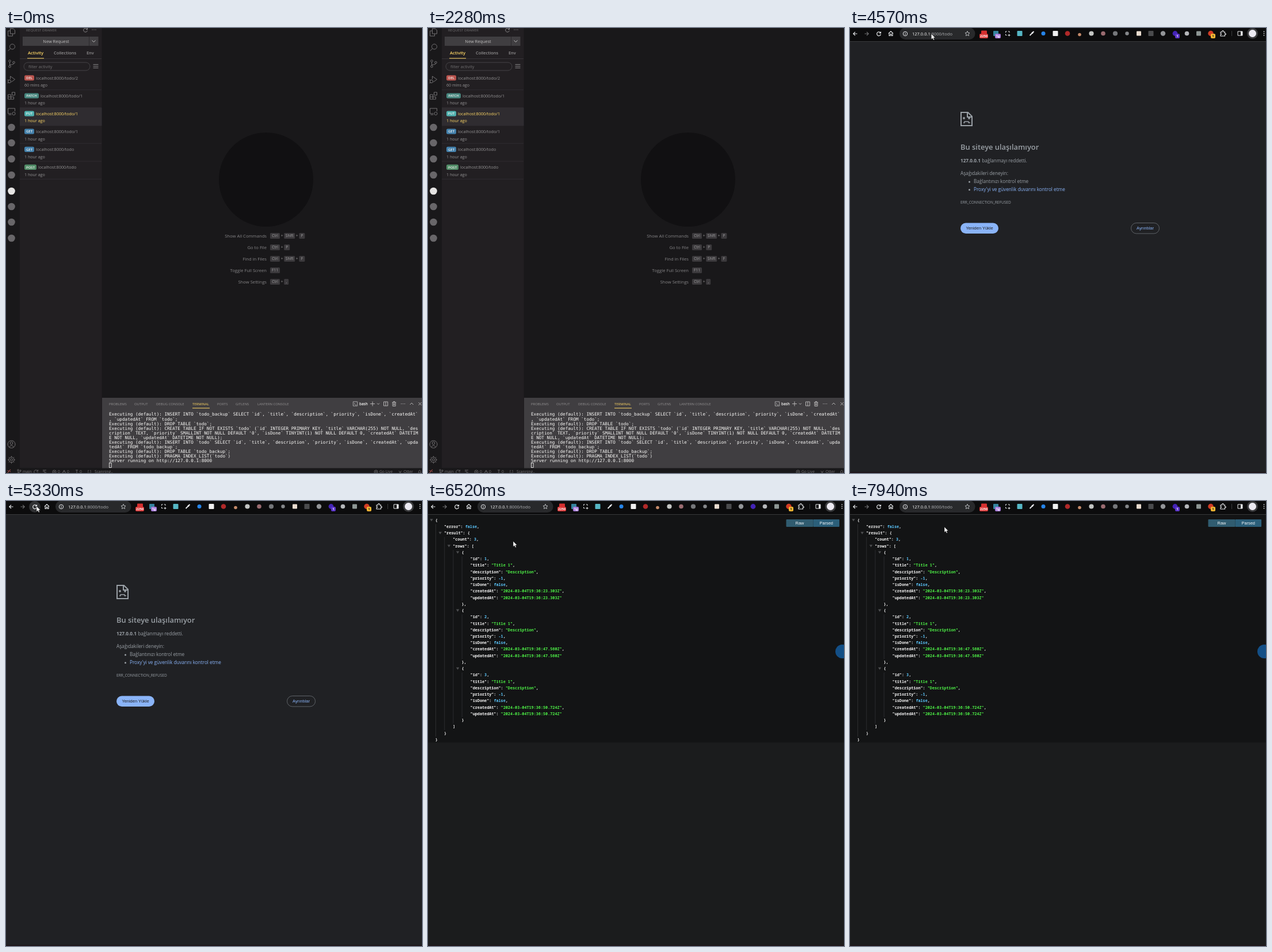
Recreate the animation shown at these times as an HTML page. Size 723x775 px, loop 8 s.

```html
<!DOCTYPE html>
<html lang="tr">
<head>
<meta charset="utf-8">
<style>
html, body { margin: 0; width: 100%; height: 100%; overflow: hidden; background: #19181a; }
svg { display: block; font-family: "Open Sans", "Noto Sans", sans-serif; }
.mono { font-family: "DejaVu Sans Mono", monospace; white-space: pre; }
.code { font-family: "Noto Sans Mono", "DejaVu Sans Mono", monospace; font-weight: 600; white-space: pre; }
.arial { font-family: "Liberation Sans", sans-serif; }
</style>
</head>
<body>
<svg id="stage" width="723" height="775" viewBox="0 0 723 775"></svg>
<script>
// Drawing helpers; text is placed by its vertical centre.
const rect = (x, y, w, h, fill, more = '') =>
  `<rect x="${x}" y="${y}" width="${w}" height="${h}" fill="${fill}" ${more}/>`;
const disc = (x, y, r, fill, more = '') => `<circle cx="${x}" cy="${y}" r="${r}" fill="${fill}" ${more}/>`;
const text = (x, y, str, size, fill, more = '') =>
  `<text x="${x}" y="${y + size * .36}" font-size="${size}" fill="${fill}" ${more}>${str}</text>`;
const icon = (x, y, d, color, width = 1, fill = 'none') =>
  `<path transform="translate(${x} ${y})" d="${d}" stroke="${color}" stroke-width="${width}" fill="${fill}"/>`;
const line = (x1, y1, x2, y2, color, width = 1) => icon(0, 0, `M${x1} ${y1}L${x2} ${y2}`, color, width);
const ring = (x, y, r) => `M${x - r} ${y}a${r} ${r} 0 1 0 ${2 * r} 0a${r} ${r} 0 1 0 ${-2 * r} 0`;
const group = (id, content) => `<g id="${id}">${content}</g>`;
const MIDDLE = 'text-anchor="middle"', END = 'text-anchor="end"', SEMI = 'font-weight="600"';
const GREY = '#727072', SOFT = '#939293', YELLOW = '#ffd866', PANEL = '#403e41', WHITE = '#fcfcfa';
const DOTS = 'M-3.5 0h1.2M-.6 0h1.2M2.3 0h1.2';
const RELOAD = 'M3-1.6A3.4 3.4 0 1 0 3.4 1M3.5-3.6V-1H.9';

function activityBar() {
  const icons = [
    [7, 'M-2-6H3L6-3V3H-2ZM-2-2H-6V7H2V3'],
    [34, ring(1.5, -1.5, 4.5) + 'M-1.7 1.7L-6 6'],
    [62, ring(-3, -4.5, 1.8) + ring(-3, 5, 1.8) + ring(4, -2, 1.8) + 'M-3-2.7V3.2M4-.2Q4 2-2.8 2'],
    [90, 'M-2-1V-6L6-.5L0 4' + ring(-3.5, 3, 2.6) + 'M-7 0l2 1M-7 6l2-1'],
    [118, 'M-6-2H-1V6H-6ZM-6 2H4V6H-1M1-6H6V-1H1Z'],
    [145, 'M0 4H-6V-5H6V0M-5 6H0' + ring(4, 4, 2.6)],
    [725, ring(0, 0, 6.5) + ring(0, -2, 2.3) + 'M-4 5Q0-1 4 5'],
    [752, ring(0, 0, 2) + ring(0, 0, 4.6) + 'M0-4.6V-6.5M0 4.6V6.5M-4.6 0H-6.5M4.6 0H6.5M3.3 3.3l1.3 1.3M-3.3-3.3l-1.3-1.3M3.3-3.3l1.3-1.3M-3.3 3.3l-1.3 1.3'],
  ];
  return icons.map(([y, d]) => icon(9.5, y, d, GREY)).join('') +
    [173, 200, 228, 256, 284, 311, 338, 366].map(y => disc(9.5, y, 6.3, y === 284 ? '#e4e3e2' : '#686669')).join('');
}

function sidebar() {
  const requests = [
    ['DEL', 17, '#b9534d', 'todo/2'], ['PATCH', 25, '#47867e', 'todo/1'], ['PUT', 17, '#4fb0ad', 'todo/1'],
    ['GET', 17, '#4380ab', 'todo/1'], ['GET', 17, '#4380ab', 'todo'], ['POST', 21, '#528d68', 'todo'],
  ];
  const rows = requests.map(([method, width, color, path], i) => {
    const y = 87 + 31.1 * i, active = i === 2, ink = active ? YELLOW : SOFT;
    return (active ? rect(24, 139, 142.5, 31, '#2f2c30') : '') +
      rect(32, y - 4.7, width, 9.2, color, 'rx="2.5"') +
      text(32 + width / 2, y, method, 6, '#f4f4f2', `${MIDDLE} ${SEMI}`) +
      text(35 + width, y, 'localhost:8000/' + path, 7.15, ink) +
      text(32, y + 12.7, i ? '1 hour ago' : '60 mins ago', 7.1, ink) +
      line(24, y + 20.7, 166, y + 20.7, '#2f2c30');
  }).join('');
  return rect(24, 0, 142.5, 766, '#221f22') +
    text(35, 3.5, 'REQUEST DRAWER', 6.1, GREY) +
    icon(138, 3.5, RELOAD, SOFT, .9) + icon(153, 3, DOTS, SOFT, 1.2) +
    rect(29, 15, 131.5, 16, PANEL) + line(144.5, 15, 144.5, 31, '#2a282b') +
    text(87, 23, 'New Request', 7.4, '#c1c0c0', MIDDLE) + icon(152.5, 23, 'M-3-1.5L0 1.5L3-1.5', '#c1c0c0') +
    text(38, 43, 'Activity', 7.6, YELLOW, SEMI) + text(83, 43, 'Collections', 7.4, SOFT, SEMI) +
    text(140, 43, 'Env', 7.4, SOFT, SEMI) +
    line(24, 53.5, 166, 53.5, '#373438') + line(37, 52.8, 66, 52.8, YELLOW) +
    rect(31, 60, 115, 14, 'none', 'rx="7" stroke="#454346"') + text(39, 67.2, 'filter activity', 7.3, GREY) +
    icon(156, 66.5, 'M-4.5-3H4.5M-4.5 0H4.5M-4.5 3H4.5', SOFT, .9) + rows;
}

function welcome() {
  const shortcuts = [['Show All Commands', 'Ctrl Shift P'], ['Go to File', 'Ctrl P'], ['Find in Files', 'Ctrl Shift F'],
    ['Toggle Full Screen', 'F11'], ['Show Settings', 'Ctrl ,']];
  const keyWidth = key => key.length > 4 ? 19 : key.length > 2 ? 17 : key === ',' ? 8 : 10;
  return disc(452, 264, 82, '#111012') + shortcuts.map(([label, keys], i) => {
    const y = 362 + 20 * i;
    let x = 459, out = text(453, y, label, 7.65, '#858486', END);
    keys.split(' ').forEach((key, k) => {
      if (k) { out += text(x + 3.6, y, '+', 6.8, SOFT, MIDDLE); x += 7.2; }
      const w = keyWidth(key);
      out += rect(x, y - 5, w, 10, '#3b393c', 'rx="1.5"') + text(x + w / 2, y, key, 6.5, '#a3a2a3', MIDDLE);
      x += w;
    });
    return out;
  }).join('');
}

function terminal() {
  const tabs = [[179, 'PROBLEMS'], [223, 'OUTPUT'], [261, 'DEBUG CONSOLE'], [324, 'TERMINAL'], [367, 'PORTS'],
    [399, 'GITLENS'], [437, 'LANTERN CONSOLE']];
  const run = 'Executing (default): ';
  const columns = '`id`, `title`, `description`, `priority`, `isDone`, `createdAt`';
  const lines = [
    run + 'INSERT INTO `todo_backup` SELECT ' + columns, ', `updatedAt` FROM `todo`;',
    run + 'DROP TABLE `todo`;',
    run + 'CREATE TABLE IF NOT EXISTS `todo` (`id` INTEGER PRIMARY KEY, `title` VARCHAR(255) NOT NULL, `des',
    "cription` TEXT, `priority` SMALLINT NOT NULL DEFAULT '0', `isDone` TINYINT(1) NOT NULL DEFAULT 0, `createdAt` DATETIM",
    'E NOT NULL, `updatedAt` DATETIME NOT NULL);',
    run + 'INSERT INTO `todo` SELECT ' + columns + ', `upda', 'tedAt` FROM `todo_backup`;',
    run + 'DROP TABLE `todo_backup`;', run + 'PRAGMA INDEX_LIST(`todo`)',
    'Server running on http://127.0.0.1:8000',
  ];
  const tools = [
    [637, 'M-4 0H4M0-4V4'], [647, 'M-2-1L0 1L2-1'], [660, 'M-3.5-3.5H3.5V3.5H-3.5ZM0-3.5V3.5'],
    [674.5, 'M-3.5-2.5H3.5M-1-2.5V-4H1V-2.5M-2.5-2.5V4H2.5V-2.5M-.8-1V2.5M.8-1V2.5'],
    [690, DOTS], [705, 'M-3 1.5L0-1.5L3 1.5'], [719.5, 'M-2.5-2.5L2.5 2.5M2.5-2.5L-2.5 2.5'],
  ];
  return rect(167, 644, 556, 122.5, PANEL) +
    tabs.map(([x, name]) => text(x, 655, name, 5.95, name === 'TERMINAL' ? YELLOW : SOFT)).join('') +
    line(324, 662, 354, 662, YELLOW) +
    icon(607, 654.5, 'M-3.7-3.7H3.7V3.7H-3.7ZM-2-1.5L-.5 0L-2 1.5M0 2H2', '#c1c0c0', .8) +
    text(614, 654.5, 'bash', 6.3, WHITE, SEMI) +
    tools.map(([x, d]) => icon(x, 654.5, d, '#c1c0c0', .9)).join('') +
    lines.map((str, i) => text(179, 672.7 + 8.06 * i, str, 7.64, WHITE, 'class="mono"')).join('') +
    rect(179.5, 757.5, 3.6, 8, 'none', `stroke="${WHITE}" stroke-width=".8"`);
}

function statusBar() {
  return icon(5, 772, 'M-2.5-1.5L0 0L-2.5 3M3-3L.5-1L3 1', '#b9534d') +
    icon(23, 772, ring(-2, -2, 1.2) + ring(2, -1, 1.2) + 'M-2-.8V4M2 .2Q2 2-2 2', GREY, .8) +
    text(29, 773, 'main', 6.7, GREY) + icon(52, 773, RELOAD, GREY, .8) +
    icon(67, 772, 'M-3-2H3M-3 0H1M-1 2H3', GREY, .8) +
    icon(84, 773, ring(0, 0, 3) + 'M-1.2-1.2L1.2 1.2M1.2-1.2L-1.2 1.2', GREY, .8) + text(90, 773, '0', 6.7, GREY) +
    icon(101, 773, 'M0-3L3.5 3H-3.5ZM0-1V1', GREY, .8) + text(106, 773, '0', 6.7, GREY) +
    icon(123, 772, 'M-2-2H2M0-2V4', GREY, .8) + text(128, 773, '0', 6.7, GREY) +
    text(142, 773, '[,]', 6.7, GREY) + text(154, 773, 'Scanning..', 6.7, GREY) +
    icon(643, 773, ring(0, 0, 3) + ring(0, 0, 1), GREY, .8) + text(649, 773, 'Go Live', 6.7, GREY) +
    icon(685, 773, 'M-2.5-2L2.5 3M2.5-2L-2.5 3', GREY, .8) + text(691, 773, 'Otter', 6.7, GREY) +
    icon(719, 773, 'M-2 2Q-2-3 0-3T2 2Z', GREY, .8);
}

function toolbar() {
  const pale = '#e8eaed', square = (x, color, s = 9) => rect(x - s / 2, 9.5 - s / 2, s, s, color, 'rx="1"');
  const badge = (x, w, label, fill, ink = '#fff') => rect(x, 10, w, 8, fill, 'rx="2"') +
    text(x + w / 2, 14, label, 5.8, ink, `${MIDDLE} font-weight="700"`);
  return rect(0, 0, 723, 24, '#0c0c0d') + line(0, 23.5, 723, 23.5, '#38393b') +
    icon(9, 10, 'M3.5 0H-3M0-3.2L-3.2 0L0 3.2', pale, 1.2) + icon(29, 10, 'M-3.5 0H3M0-3.2L3.2 0L0 3.2', '#747577', 1.1) +
    disc(50, 10, 10, '#303133', 'id="hover"') +
    group('reload', icon(50, 10, RELOAD, pale, 1.2)) + group('stop', icon(50, 10, 'M-3-3L3 3M3-3L-3 3', pale, 1.2)) +
    icon(71, 9.5, 'M-4 0L0-3.7L4 0M-3-.8V4H-1V1H1V4H3V-.8', pale, 1.1) +
    rect(86, -.5, 131.5, 20.5, '#28292b', 'rx="10"') + icon(96, 10, ring(0, 0, 3.7) + 'M0-.5V2M0-2V-1.2', pale) +
    text(108, 10, '127.0.0.1<tspan fill="#b0b2b5">:8000/todo</tspan>', 7.5, '#fff') +
    icon(204, 9.5, 'M0-4L1.2-1.3L4-1L1.9 1L2.5 4L0 2.5L-2.5 4L-1.9 1L-4-1L-1.2-1.3Z', '#c6c8cb', .9) +
    square(233, '#d62f2f', 10) + badge(225, 15, '2250', '#d93636') +
    square(253.5, '#35849e') + badge(252, 10, '1g', '#a77bd8') +
    icon(274, 9.5, 'M-3.5-1.5V-3.5H-1.5M1-3.5H3V-1.5M-3.5 1V3H-1.5M2.5 1V5M.5 3H4.5', pale) +
    square(295, '#55b6c4') + icon(316, 9.5, 'M-3.5 3.5L1-1', pale, 1.8) + icon(316, 9.5, 'M0-2L2 0M1.5-1.5L3.5-3.5', pale, 2) +
    disc(336, 9.5, 3.5, '#2684e8') + square(357, '#f0f0f0') + disc(378, 9.5, 4.3, '#b02929') +
    disc(399, 11.5, 2.8, '#c58a6a', 'id="picker"') + disc(419.5, 9.5, 4.1, '#c3c5c3') + disc(440, 9.5, 3.8, '#9a6b70') +
    group('noteIdle', disc(461, 9.5, 4.1, '#75777a')) + group('noteBusy', square(461, '#cdb936', 8)) +
    disc(481.5, 9.5, 3.2, '#85878a') + square(502, '#eadccf', 8) + square(523, '#4a4b4d', 9) +
    disc(544, 9.5, 4.2, '#939598') + disc(565, 9.5, 4.4, '#4323b5') + group('badge', badge(565, 8, '1', '#5b35c8')) +
    disc(585.5, 9.5, 3.8, '#b4b6b9') + square(606, '#8d9694', 8) + disc(627, 9.5, 4.7, '#d13c24') +
    badge(627, 8, '1', '#f2b632', '#222') +
    icon(648, 9.5, 'M-4-2.5H-1.5Q-1.5-5 0-5T1.5-2.5H3.5V0Q5.5 0 5.5 1T3.5 2V4.5H-4V2Q-2.5 2-2.5 1T-4 0Z', pale, 1.1) +
    line(663.5, 5, 663.5, 14, '#3a3b3d') + icon(678, 9.5, 'M-4-3.5H4V3.5H-4Z', pale) + rect(679, 6, 3, 7, pale) +
    disc(699.5, 9.5, 9.5, '#3a3b3d') + disc(699.5, 9.5, 6.5, '#eceaf2') +
    icon(719.5, 9.5, 'M0-4V-2.6M0-.7V.7M0 2.6V4', pale, 1.5);
}

function errorPage() {
  const ink = '#9aa0a6', blue = '#8ab4f8';
  return rect(0, 24, 723, 751, '#202124') +
    icon(192, 146, 'M1 1H13L20 8V24H1ZM12 1V9H20', ink, 2) +
    icon(192, 146, 'M5 10H7V12H5ZM14 10H16V12H14ZM5 19H7V17H14V19H16V18', ink, 1.4) +
    text(192, 207, 'Bu siteye ulaşılamıyor', 12.9, ink, SEMI) +
    text(192, 231.3, '<tspan font-weight="700">127.0.0.1</tspan> bağlanmayı reddetti.', 8.2, ink) +
    text(192, 253.5, 'Aşağıdakileri deneyin:', 8.2, ink) +
    disc(207.5, 268, 1.5, ink) + text(215, 267.5, 'Bağlantınızı kontrol etme', 8.2, ink) +
    disc(207.5, 281.7, 1.5, ink) + text(215, 281.2, "Proxy'yi ve güvenlik duvarını kontrol etme", 8.2, blue) +
    text(192, 303.5, 'ERR_CONNECTION_REFUSED', 6.55, ink) +
    rect(192, 339.5, 66, 18.5, blue, 'rx="9.25"') + text(225, 348.7, 'Yeniden Yükle', 7.45, '#202124', `${MIDDLE} class="arial"`) +
    rect(488.5, 339.5, 49, 18.5, 'none', 'rx="9.25" stroke="#5f6368"') +
    text(513, 348.7, 'Ayrıntılar', 7.5, blue, `${MIDDLE} class="arial"`);
}

function jsonPage() {
  const rowY = n => 33.3 + 11.235 * n, indent = n => 12.8 + 15.2 * n;
  const todo = (id, stamp, last) => [
    [3, '{'], [4, `"id": ${id},`], [4, '"title": "Title 1",'], [4, '"description": "Description",'],
    [4, '"priority": -1,'], [4, '"isDone": false,'],
    [4, `"createdAt": "2024-03-04T19:36:${stamp}Z",`], [4, `"updatedAt": "2024-03-04T19:36:${stamp}Z"`],
    [3, last ? '}' : '},'],
  ];
  const rows = [[0, '{'], [1, '"error": false,'], [1, '"result": {'], [2, '"count": 3,'], [2, '"rows": ['],
    ...todo(1, '23.303'), ...todo(2, '47.560'), ...todo(3, '50.724', true), [2, ']'], [1, '}'], [0, '}']];
  const paint = str => str.replace(/(: )(".*"|-?\d+|false)/, (_, colon, value) =>
    `${colon}<tspan fill="${value[0] === '"' ? '#4df046' : '#5cc8ff'}">${value}</tspan>`);
  const guides = [[0, 0, 34], [1, 2, 33], [2, 4, 32], [3, 5, 13], [3, 14, 22], [3, 23, 31]];
  const button = (x, w, label, fill) => rect(x, 32, w, 13, fill, 'rx="1"') +
    text(x + w / 2, 38.5, label, 7.4, '#f2f6f8', `${MIDDLE} class="arial"`);
  return rect(0, 24, 723, 751, '#1b1c1d') + rect(0, 24, 723, 396.5, '#131415') +
    guides.map(([level, from, to]) => {
      const x = indent(level);
      return line(x + .7, rowY(from) + 7, x + .7, rowY(to) - 5, '#2c2d2f') +
        icon(x - 6.8, rowY(from), 'M-2.7-2H2.7L0 2.3Z', 'none', 0, '#4d4e50');
    }).join('') +
    rows.map(([level, str], n) => text(indent(level), rowY(n), paint(str), 6.8, '#f4f4f4', 'class="code"')).join('') +
    button(622.5, 47, 'Raw', '#305c70') + button(669.5, 45.5, 'Parsed', '#2b5f7a') +
    disc(720, 262, 12, '#134f86', 'id="float"');
}

document.getElementById('stage').innerHTML =
  group('editor', rect(0, 0, 723, 775, '#19181a') + activityBar() + sidebar() + welcome() + terminal() + statusBar()) +
  group('browser', group('error', errorPage()) + group('json', jsonPage()) + toolbar() +
    rect(0, 773, 723, 2, '#1d1519')) +
  group('pointer',
    group('arrow', icon(0, 0, 'M0 0V9.6L2.2 7.6L3.8 11L5.4 10.3L3.9 7H6.8Z', '#111', .5, '#fff')) +
    group('beam', icon(0, 0, 'M-2-4.5H2M0-4.5V4.5M-2 4.5H2', '#d8d8d8', .9)));

// Pointer tracks: [time, x, y]. The pointer is hidden outside them.
const TRACKS = [
  [[1000, 27, 599], [1230, 209, 523], [1540, 146, 547], [1810, 146, 547], [2280, -9, 748]],
  [[4080, 284, 517], [4640, 135, -12]],
  [[4840, 52, -8], [4980, 53, 9], [5480, 53, 9], [5760, 124, 252], [6030, 136, 262], [6110, 136, 262],
   [6520, 148, 70], [6850, 150, 76], [6920, 150, 76], [7180, 110, 341], [7420, 52, 210], [7670, 182, 111],
   [7730, 182, 111], [7940, 164, 45], [8000, 164, 45]],
];
const el = id => document.getElementById(id);
const show = (id, on) => el(id).style.display = on ? '' : 'none';
const clamp = v => Math.min(1, Math.max(0, v));
const smooth = v => v * v * (3 - 2 * v);

function pointerAt(t) {
  const track = TRACKS.find(keys => t >= keys[0][0] && t < keys.at(-1)[0]);
  if (!track) return null;
  const next = track.findIndex(key => key[0] > t), [t0, x0, y0] = track[next - 1], [t1, x1, y1] = track[next];
  const k = smooth((t - t0) / (t1 - t0));
  return [x0 + (x1 - x0) * k, y0 + (y1 - y0) * k];
}

function render(t) {
  const loaded = t >= 5600, settled = t >= 6200, loading = t >= 5420 && t < 6030;
  show('editor', t < 3820);
  show('browser', t >= 3820);
  show('error', !loaded);
  show('json', loaded);
  show('reload', !loading);
  show('stop', loading);
  show('float', t >= 6300);
  show('badge', !loaded || t >= 7000);
  show('noteBusy', loaded && !settled);
  show('noteIdle', !loaded || settled);
  el('picker').setAttribute('fill', loaded && !settled ? '#2a2a2c' : '#c58a6a');
  el('hover').setAttribute('opacity', Math.min(clamp((t - 4840) / 280), clamp((6030 - t) / 400)));

  const at = pointerAt(t);
  show('pointer', at);
  if (!at) return;
  const [x, y] = at, overText = loaded && x > 74 && x < 140 && y > 95 && y < 375;
  el('pointer').setAttribute('transform', `translate(${x} ${y})`);
  show('beam', overText);
  show('arrow', !overText);
}

const start = performance.now();
(function tick() {
  render((performance.now() - start) % 8000);
  requestAnimationFrame(tick);
})();
</script>
</body>
</html>
```
